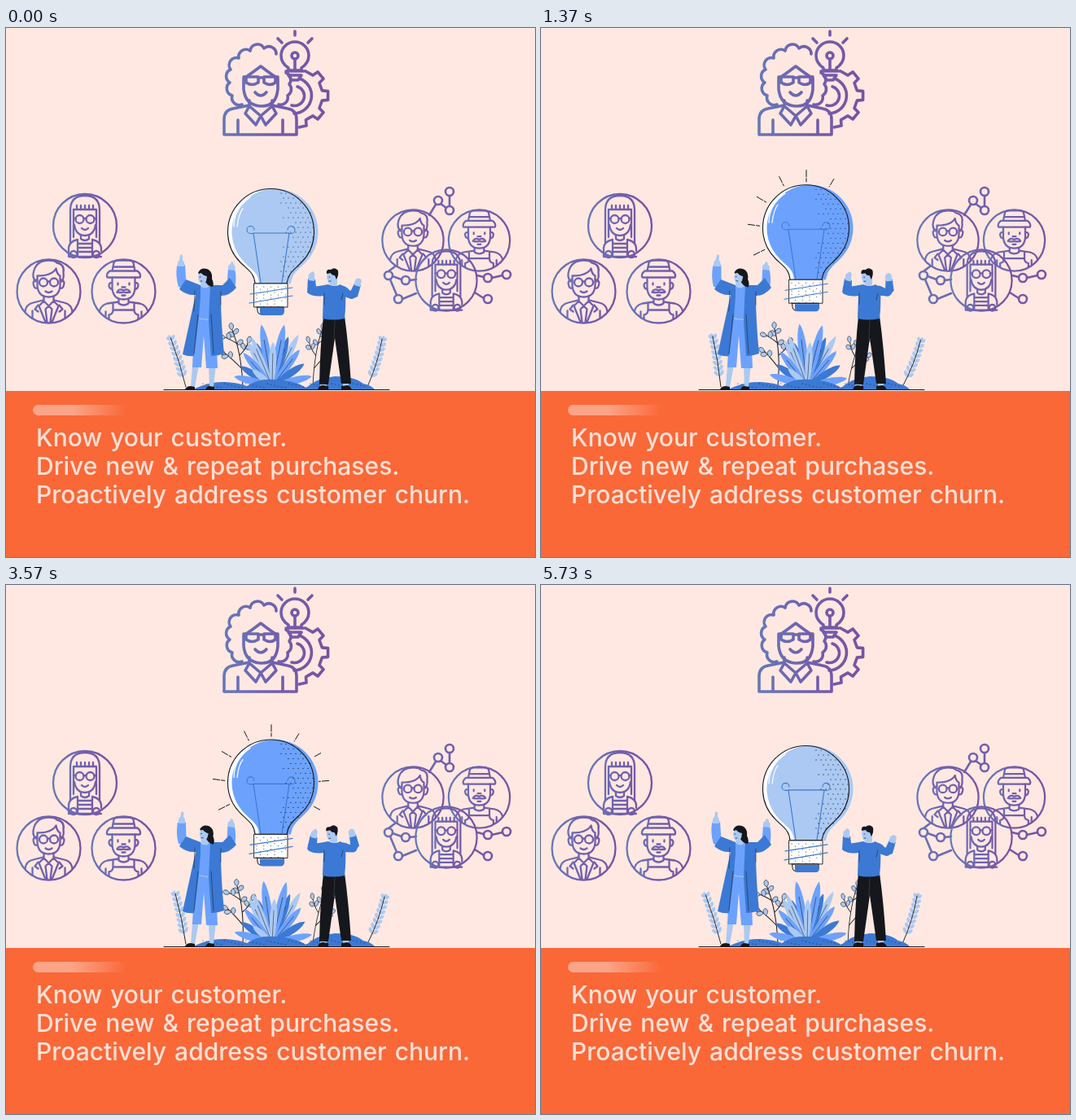
Recreate the animation shown at these times as an HTML page. Size 650 px wide and 650 px high, loop 5.76 s.

```html
<!DOCTYPE html>
<html lang="en">
<head>
<meta charset="utf-8">
<title>Know your customer</title>
<style>
html,body{margin:0;width:100%;height:100%;overflow:hidden;background:#fee8e1}
svg{display:block;width:100vw;height:100vh}
.msg{font:500 30px Inter,"Open Sans",sans-serif;word-spacing:2px;fill:#fee1d8}
.line{fill:none;stroke-linecap:round;stroke-linejoin:round}
</style>
</head>
<body>
<svg id="stage" viewBox="0 0 650 650" xmlns="http://www.w3.org/2000/svg"></svg>
<script>
const LOOP = 5760;
const INK = '#15171c', DARK = '#3c79d4', MID = '#6ca2fd', PALE = '#abc9f2', WHITE = '#fff';

const path = (d, attrs = '') => `<path d="${d}" ${attrs}/>`;
const fill = (d, color) => path(d, `fill="${color}"`);
const stroke = (d, color, width = 1) => path(d, `class="line" stroke="${color}" stroke-width="${width}"`);
const dot = (x, y, r, color) => `<circle cx="${x}" cy="${y}" r="${r}" fill="${color}"/>`;
const ring = (x, y, r) => `<circle cx="${x}" cy="${y}" r="${r}"/>`;
const group = (id, body, attrs = '') => `<g id="${id}" ${attrs}>${body}</g>`;
const use = (id, x, y, s = 1) => `<use href="#${id}" transform="translate(${x} ${y}) scale(${s})"/>`;

function leaf(x, y, len, w, angle, color, edge = '') {
  const d = `M0 0C${w} ${-len * .3} ${w} ${-len * .85} 0 ${-len}C${-w} ${-len * .85} ${-w} ${-len * .3} 0 0`;
  return path(d, `transform="translate(${x} ${y}) rotate(${angle})" fill="${color}" ${edge}`);
}

function gradient(id, x1, x2) {
  return `<linearGradient id="${id}" gradientUnits="userSpaceOnUse" x1="${x1}" y1="0" x2="${x2}" y2="0">
    <stop stop-color="#6678b9"/><stop offset=".5" stop-color="#705fae"/><stop offset="1" stop-color="#7c4f9f"/></linearGradient>`;
}

// ---- Outline portraits, centred on 0,0
const girl = ring(0, 0, 39) +
  path('M-18 21V-19Q-18-37 0-37T18-19V21M-14 14V-20H14V14') +
  path('M-10-25v5M-5-25v5M0-25v5M5-25v5M10-25v5') +
  ring(-6.5, -8, 5) + ring(6.5, -8, 5) +
  path('M-1.5-9H1.5M-14-9H-11.5M14-9H11.5M-4 3Q0 7 4 3M-13-1Q-11 12 0 12T13-1') +
  path('M-5 12V16Q0 20 5 16V12M-20 38V27Q-19 19-9 17V38M20 31V27Q19 19 9 17V38M-9 22H9M-9 27H9M-9 32H9M-20 38H20') +
  ring(-14, 35, 4) + ring(14, 35, 4);

const clerk = ring(0, 0, 39) +
  path('M-16-12Q-21-17-18-26Q-14-38 0-38Q8-38 10-35Q20-33 18-23Q19-16 16-12') +
  path('M-14-19Q4-19 9-28Q10-21 14-19M-14-19V-7Q-13 7 0 7T14-7V-19M-15-14Q-21-13-18-6Q-17-3-14-4M15-14Q21-13 18-6Q17-3 14-4') +
  ring(-6.5, -11, 5) + ring(6.5, -11, 5) +
  path('M-1.5-12H1.5M-4 0Q0 3 4 0M-6 6V12L0 18L6 12V6M-6 12L-12 18L-4 38M6 12L12 18L4 38M0 18L-4 22L-2 38M0 18L4 22L2 38') +
  path('M-29 25Q-28 16-19 14L-7 11M29 25Q28 16 19 14L7 11M-20 24V33M20 24V33M-13 17L-17 22L-13 25M13 17L17 22L13 25');

const farmer = ring(0, 0, 39) +
  path('M-14-25L-12-35Q-11-38-6-38H6Q11-38 12-35L14-25M-13-30H13M-17-25H17Q22-21 20-17H-20Q-22-21-17-25') +
  path('M-14-17V-4Q-13 10 0 10T14-4V-17M-14-11Q-20-10-17-4L-14-2M14-11Q20-10 17-4L14-2') +
  path('M-7-10v2M7-10v2M-2-5H2M-8 1Q-6-4 0-1Q6-4 8 1Q3 2 0 1Q-3 2-8 1M-2 5H2') +
  path('M-6 10V15Q0 19 6 15V10M-30 25Q-28 17-20 15L-6 13M30 25Q28 17 20 15L6 13M-13 14V23H13V14M-18 34V29Q-13 28-13 23M18 34V29Q13 28 13 23M-22 25V31M22 25V31');

// ---- Thinker with gear and lamp
function thinker() {
  const cx = 357, cy = 83, unit = Math.PI / 9;
  const at = (r, a) => `${(cx + r * Math.cos(a)).toFixed(1)} ${(cy + r * Math.sin(a)).toFixed(1)}`;
  const teeth = [-1, 0, 1, 2].map(i => {
    const a = i * unit * 2;
    return [at(32, a - unit * .55), at(39, a - unit * .4), at(39, a + unit * .4), at(32, a + unit * .55)].join('L');
  });
  const curls = (start, ...ends) => `M${start}` + ends.map(p => `A9 9 0 0 1 ${p}`).join('');
  return path(`M368 53L${teeth.slice(0, 3).join('L')}L${teeth[3].split('L').slice(0, 2).join('L')}L360 122`) +
    path('M360 62A22 22 0 0 1 354 105M358 72A12 12 0 0 1 351 95') +
    path(curls('290 94', '278 83', '275 67', '276 51', '286 37', '300 28', '317 25', '332 32') +
      curls('344 55', '348 69', '346 83', '335 94')) +
    path('M292 62V75Q294 95 313 96T334 75V62M292 62Q300 57 313 47Q326 57 334 62') +
    path('M292 60H310V67Q302 72 295 67V60M317 60H334M317 60V67Q325 72 331 67V60M310 61H317M306 79Q313 87 320 79') +
    path('M299 89V95L279 99Q268 101 268 112V131H357V112Q357 101 346 99L327 95V89M285 113V130M340 113V130') +
    path('M299 96L294 105L307 119L313 108L299 96M327 96L332 105L319 119L313 108L327 96') +
    path('M347 52V49Q338 43 338 34A17 17 0 0 1 372 34Q372 43 363 49V52ZM344 53H366M347 58H363L359 64H351ZM355 38V51') +
    ring(355, 34, 4) + path('M355 4V9M334 13L339 18M376 13L371 18');
}

const network = path('M545 207V219M534 216L541 221M528 217L520 230M470 299L478 293M472 309L480 328M475 305L486 309M496 310L504 309M487 333L504 326M610 304L597 307M587 306L579 304M587 332L576 325') +
  [[545, 201], [531, 212], [545, 224], [470, 304], [491, 310], [482, 333], [615, 303], [592, 307], [592, 333]]
    .map(([x, y]) => ring(x, y, 5)).join('');

// ---- Plants
function frond(id, x, y, tipX, tipY, bend) {
  const dx = tipX - x, dy = tipY - y;
  const mx = x + dx / 2 + bend, my = y + dy / 2;
  const lean = Math.atan2(dx, -dy) * 180 / Math.PI;
  let leaves = '';
  for (let i = 2; i <= 9; i++) {
    const k = i / 9.5, q = 1 - k;
    const px = q * q * x + 2 * q * k * mx + k * k * tipX;
    const py = q * q * y + 2 * q * k * my + k * k * tipY;
    for (const side of [-1, 1]) leaves += leaf(px, py, 9.5 - k * 2, 2.9, lean + side * 40, PALE);
  }
  leaves += leaf(tipX, tipY + 3, 7, 2.5, lean, PALE);
  return group(id, leaves + stroke(`M${x} ${y}Q${mx} ${my} ${tipX} ${tipY}`, INK, .9));
}

function sprig(id, x, flip) {
  const edge = `stroke="${INK}" stroke-width=".6"`;
  let body = stroke('M0 0Q-2-42-14-70M-2-22Q-14-34-22-40M-4-38Q4-46 6-54M-7-52Q-17-58-23-60', INK, 1);
  for (const [lx, ly, a] of [[-14, -69, -8], [-12, -64, 45], [-11, -61, -55], [-22, -59, -75], [-17, -57, -10],
    [-22, -39, -60], [-15, -34, -5], [-18, -37, -100], [6, -53, 20], [3, -46, 70], [2, -45, -25], [-7, -51, 50]])
    body += leaf(lx, ly, 8.5, 3.6, a, PALE, edge);
  return group(id, `<g transform="translate(${x} 440) scale(${flip} 1)">${body}</g>`);
}

// angle, length, half width, colour
const blades = [
  [-29, 62, 6, PALE], [27, 71, 6, PALE], [-20, 56, 6, DARK], [18, 64, 6, DARK], [-10, 77, 7, MID], [11, 77, 7, MID],
  [-23, 66, 5, PALE], [1, 54, 6, PALE], [-41, 54, 6, MID], [37, 56, 6, MID], [-58, 46, 6, DARK], [55, 48, 6, DARK],
  [-50, 32, 5, PALE], [-76, 48, 6, MID], [76, 50, 6, MID]
];
const bush = group('bush', blades.map(([a, len, w, c]) =>
  leaf(327, 440, len, w, a, c) + (len > 50 ? `<path d="M327 440V${440 - len * .75}" stroke="${INK}" stroke-width=".5" transform="rotate(${a} 327 440)"/>` : '')).join(''));

function mounds() {
  let specks = '';
  for (let i = 0; i < 46; i++) specks += dot(242 + i * 4.4, 437 + (i * 7) % 6, .5, INK);
  return fill('M228 445Q250 434 270 435Q287 436 296 440Q310 430 330 432Q352 432 369 442Q382 430 404 428Q428 428 439 437Q449 439 454 445Z', DARK) + specks;
}

// ---- People
const woman =
  fill('M229 414L227 441H232L237 414ZM249 414L250 441H255L258 414Z', PALE) +
  fill('M220 444Q222 440 227 440L232 441V444ZM245 444Q247 440 250 440L256 441V444Z', INK) +
  fill('M234 355H254Q259 380 260 418H246L243 378L240 417H229Q230 385 234 355Z', MID) +
  fill('M235 317H256V359H234Z', MID) + stroke('M235 356Q243 359 252 358', PALE, 1.2) +
  group('armL', fill('M210 292Q208 306 212 318L222 322L220 291Z', MID) +
    fill('M211 293Q210 287 213 285L214 279Q216 277 217 280L217 285Q220 288 219 293Z', PALE)) +
  group('armR', fill('M273 296L271 320L281 320Q284 306 281 296Z', MID) +
    fill('M273 297Q272 291 276 290L277 287Q280 287 280 291Q283 293 281 298Z', PALE)) +
  fill('M239 316L221 309L213 321Q222 329 233 328L227 355L217 401Q224 404 231 403L237 355L239 330ZM251 316L266 316L275 307L283 319Q275 329 264 329Q264 360 268 400Q260 403 252 403L249 360Z', DARK) +
  stroke('M232 323L231 348M264 324V340M236 352L231 400M252 352L255 400', INK, .5) +
  fill('M240 309L239 317Q245 322 250 317V309Z', PALE) +
  group('headW', fill('M236 301Q239 294 247 296Q254 299 253 308Q256 314 254 318Q247 317 244 310Z', INK) +
    fill('M237 302L236 307L238 313Q242 316 246 311L247 305Q242 304 240 301Z', PALE) + stroke('M238 306h1M239 311h2', INK, .7));

const man =
  fill('M386 433H394V441H386ZM414 433H421V441H414Z', PALE) +
  fill('M383 445Q384 439 389 439L396 440V445ZM412 445V440L420 439Q424 441 425 445Z', INK) +
  fill('M390 354H416Q421 390 424 437H412L404 381L396 438H385Q386 390 390 354Z', INK) +
  stroke('M404 360L403 382M391 437H387', '#555', .5) +
  group('foreL', fill('M371 308L370 325Q375 329 382 326L380 309Z', DARK) +
    fill('M372 310Q370 303 374 301L376 299Q380 300 379 305L379 311Z', PALE)) +
  group('foreR', fill('M422 326Q426 334 432 330L436 316L428 314Z', DARK) +
    fill('M428 316Q428 309 431 308Q436 306 437 311L435 318Z', PALE)) +
  group('upperR', fill('M409 316Q417 316 422 322L431 327Q429 333 424 333L413 329Z', DARK)) +
  fill('M396 315Q404 319 411 315L417 321Q418 340 416 357Q402 360 389 357L390 329Q379 331 371 326L371 318Q382 318 396 315Z', DARK) +
  stroke('M391 326L391 340M414 326L412 334', INK, .5) +
  fill('M398 308V315Q403 319 407 315V307Z', PALE) +
  group('headM', fill('M395 301L394 306L396 313Q402 316 406 310L407 300Z', PALE) +
    fill('M394 302Q393 296 399 297Q404 293 408 298Q409 304 406 309L404 304Q400 304 399 301Z', INK) + stroke('M397 306h1M397 311h2', INK, .7));

// ---- Big bulb
function bulb() {
  const glass = 'M306 314C305 301 298 298 288 288A53 53 0 1 1 363 288C353 298 347 301 345 314Z';
  let dots = '';
  for (let row = 0; row < 18; row++)
    for (let x = 338 + (row % 2) * 3; x < 382; x += 6) {
      const y = 203 + row * 6;
      const inside = Math.hypot(x - 327, y - 251) < 53 || (y > 285 && x < 366 - (y - 285) * .8);
      if (inside && Math.hypot(x - 305, y - 250) > 47 - 9 * ((row * 5 + x) % 3 === 0)) dots += dot(x, y, .55, INK);
    }
  for (let i = 0; i < 34; i++) dots += dot(308 + (i % 9) * 4.4, 318 + Math.floor(i / 9) * 7 + i % 2 * 3, .5, INK);
  return fill(glass, WHITE) +
    path('M311 314C310 301 303 298 293 288A53 53 0 1 1 368 288C358 298 352 301 350 314Z', 'id="glow"') +
    stroke(glass, INK, 1.1) +
    stroke('M280 244Q280 222 300 208M284 244Q286 228 291 222', WHITE, 1.2) +
    stroke('M313 313L304 252H348L339 313M305 248A4.5 4.5 0 1 0 300.5 252.5H304M346 248A4.5 4.5 0 1 1 350.5 252.5H347', DARK, 1.1) +
    fill('M305 314H346V343H305Z', WHITE) + dots +
    stroke('M305 314H346V343H305Z', INK, .9) +
    stroke('M300 327L352 319M299 338L352 329', DARK, 1.2) +
    stroke('M309 343H341V348Q340 352 337 352H313Q309 351 309 348Z', INK, 1) +
    fill('M312 344H342V349Q341 353 338 353H316Q312 353 312 349Z', DARK);
}

const rays = ['M261 284L275 277', 'M254 246L269 248', 'M265 212L277 219', 'M292.5 187L298.5 199', 'M326 179V194',
  'M360 190L354 200', 'M387 214L378 219', 'M397 248L384 249', 'M386 284L377 279'];
const rayMarks = rays.map((d, i) => path(d, `id="ray${i}" stroke="${INK}" stroke-width="1" stroke-dasharray="9 1.2 6"`)).join('');

// ---- Assemble
const stage = document.getElementById('stage');
stage.innerHTML = `<defs>${gradient('tintBig', 266, 397)}${gradient('tint', -40, 40)}${gradient('tintNet', 440, 640)}
  <linearGradient id="fade"><stop stop-color="#fff" stop-opacity=".4"/><stop offset=".42" stop-color="#fff" stop-opacity=".4"/><stop offset="1" stop-color="#fff" stop-opacity="0"/></linearGradient>
  ${[['girl', girl], ['clerk', clerk], ['farmer', farmer]].map(([id, body]) => group(id, body, 'class="line" stroke="url(#tint)" stroke-width="2.3"')).join('')}</defs>
  <rect width="650" height="650" fill="#fee8e1"/>` +
  group('thinker', thinker(), 'class="line" stroke="url(#tintBig)" stroke-width="3.6"') +
  use('girl', 97, 243) + use('clerk', 52.5, 323.5) + use('farmer', 144.5, 323.5) +
  group('network', network, 'class="line" stroke="url(#tintNet)" stroke-width="2.6"') +
  use('clerk', 500, 261, .965) + use('farmer', 581.5, 261, .965) + use('girl', 541, 310, .965) +
  group('bulb', bulb() + rayMarks) +
  frond('frondL', 221, 441, 202, 381, 2) + frond('frondR', 444, 441, 462, 382, 4) +
  sprig('sprigL', 291, 1) + sprig('sprigR', 377, -.8) +
  bush + mounds() + woman + man +
  stroke('M194 444.5H471', INK, 1) +
  `<rect y="446" width="650" height="204" fill="#fa6838"/>
  <path d="M148 463H39.5a6.5 6.5 0 0 0 0 13H148Z" fill="url(#fade)"/>
  <text class="msg" x="37" y="514">Know your customer.</text>
  <text class="msg" x="37" y="549">Drive new &amp; repeat purchases.</text>
  <text class="msg" x="37" y="584">Proactively address customer churn.</text>`;

// ---- Motion
const part = {};
stage.querySelectorAll('[id]').forEach(el => part[el.id] = el);
const turn = (id, angle, x, y, dx = 0, dy = 0) =>
  part[id].setAttribute('transform', `translate(${dx} ${dy}) rotate(${angle} ${x} ${y})`);
const ramp = (t, from, to) => Math.min(1, Math.max(0, (t - from) / (to - from)));
const mix = (a, b, k) => Math.round(a + (b - a) * k);

function draw(t) {
  const sway = (1 + Math.cos(2 * Math.PI * (t - 1250) / (LOOP / 2))) / 2;
  const raise = Math.sin(Math.PI * t / LOOP);
  const lift = -10 * (1 - Math.abs(2 * t / LOOP - 1));
  const glow = ramp(t, 600, 1270) * (1 - ramp(t, 4750, 5400));

  part.bulb.setAttribute('transform', `translate(0 ${lift})`);
  part.glow.setAttribute('fill', `rgb(${mix(171, 108, glow)},${mix(201, 162, glow)},${mix(242, 253, glow)})`);
  rays.forEach((_, i) => {
    const shown = t >= 750 + i * 115 && t < 5400 - i * 80;
    part['ray' + i].setAttribute('visibility', shown ? 'visible' : 'hidden');
  });

  turn('frondL', 8.5 * sway, 221, 441);
  turn('frondR', 4.5 * sway, 444, 441);
  turn('sprigL', 8 * sway, 291, 440);
  turn('sprigR', 8 * sway, 377, 440);
  turn('bush', 3 * sway, 327, 440);

  turn('armL', 3 * sway, 217, 318);
  turn('armR', -2 * sway, 276, 320);
  turn('headW', 5 * raise, 245, 315, raise, 0);
  turn('headM', -3 * raise, 403, 314);
  turn('foreL', 10 * raise, 375, 325);
  turn('upperR', -20 * raise, 412, 321);
  turn('foreR', -35 * raise, 426, 328, 2 * raise, -7 * raise);
}

const start = performance.now();
function tick() {
  draw((performance.now() - start) % LOOP);
  requestAnimationFrame(tick);
}
tick();
</script>
</body>
</html>
```
